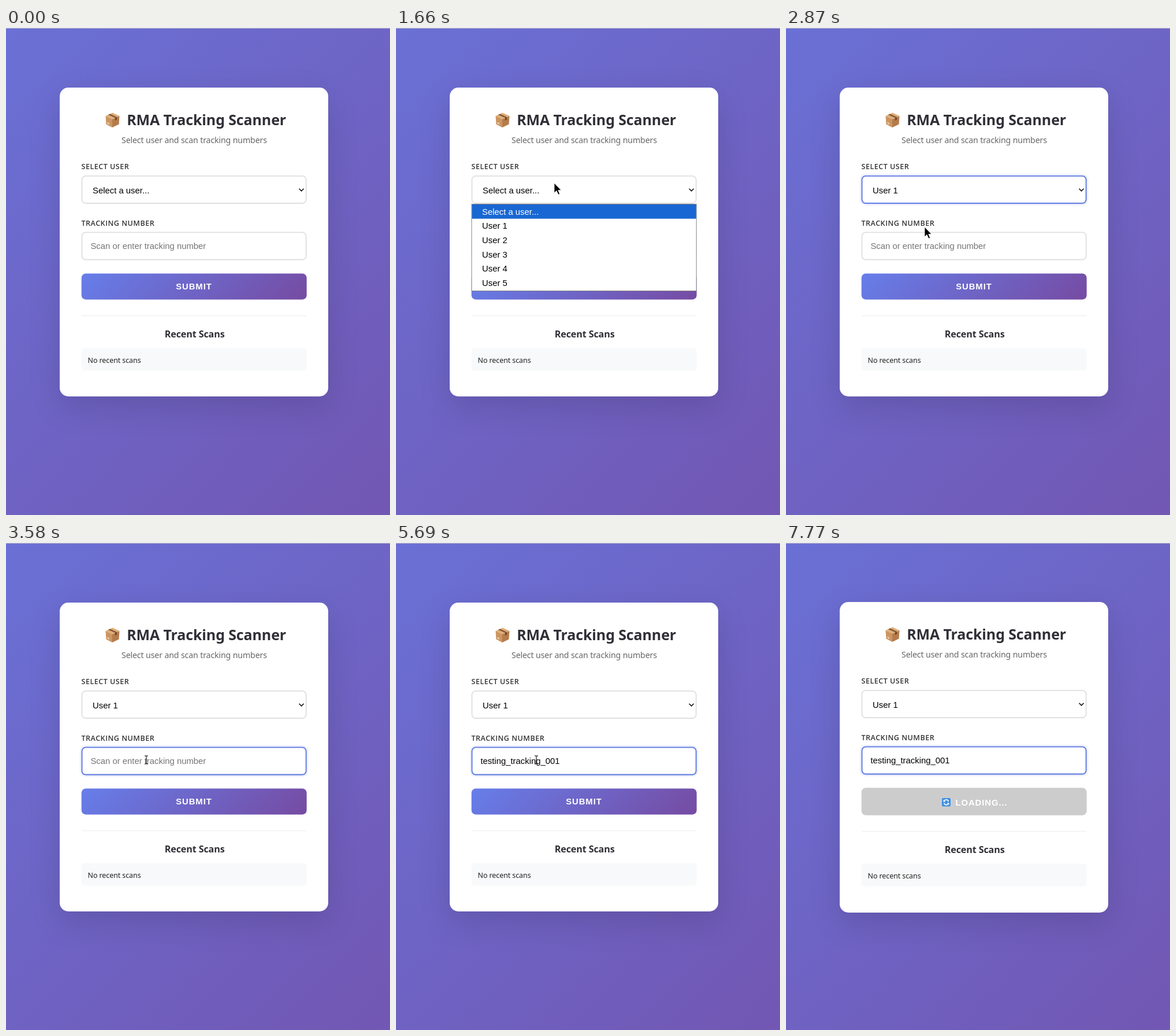
Write an HTML page that moves like this. It is 665 by 842 pixels and loops after 8000 ms.

```html
<!DOCTYPE html>
<html lang="en">
<head>
<meta charset="utf-8">
<title>RMA Tracking Scanner</title>
<style>
html, body { margin: 0; width: 100%; height: 100%; overflow: hidden; }
body { position: relative; background: linear-gradient(135deg, #6a70d5, #7257b3); }
body::before { content: ""; position: absolute; inset: 0 0 auto; height: 1px; background: #b4b4cd; }
.card {
  position: absolute; left: 93px; top: 103px; width: 465px; height: 534px;
  border-radius: 15px; background: #fff;
  box-shadow: 0 18.6px 55.7px rgba(0, 0, 0, .13);
}
svg { position: absolute; left: 0; top: 0; width: 665px; height: 842px; }

/* type */
text { white-space: pre; }
.title, .sub, .recent, .none, .tip text { font-family: "Noto Sans", "Open Sans", sans-serif; }
.title { font-size: 25px; font-weight: 700; letter-spacing: -.13px; fill: #2f2f36; }
.sub { font-size: 14.2px; letter-spacing: -.15px; fill: #666; }
.label { font: 600 12.6px "Open Sans", "Noto Sans", sans-serif; letter-spacing: .47px; fill: #333; }
.recent { font-size: 16.2px; font-weight: 700; letter-spacing: -.15px; fill: #2f2f36; }
.none { font-size: 12.5px; letter-spacing: -.1px; fill: #222; }
.field, .popup text { font: 14.86px "Liberation Sans", Arial, sans-serif; fill: #000; }
.hint { fill: #757575; }
.btn { font: 700 14.86px "Liberation Sans", Arial, sans-serif; letter-spacing: .93px; fill: #fff; }
.tip text { font-size: 10.2px; text-anchor: middle; fill: #444; }
.tip rect { fill: #fff; stroke: #c8c8c8; }

.box { fill: #fff; stroke: #e0e0e0; stroke-width: 1.86; }
.focus { fill: none; stroke: #5f7ce4; stroke-width: 1.86; }
.ring { fill: none; stroke: #667eea; stroke-opacity: .12; stroke-width: 2.8; }

/* timeline: 8 s, 1% = 80 ms */
.step { animation: 8s step-end infinite; }
.ease { animation: 8s ease infinite; }

.card { animation-name: grow; }
.upper { animation-name: up; }
.lower { animation-name: down; }
@keyframes grow { 72.75%, to { top: 102px; height: 536.5px; } }
@keyframes up { 72.75%, to { transform: translateY(-1px); } }
@keyframes down { 72.75%, to { transform: translateY(1px); } }

.unpicked { animation-name: unpicked; }
.picked { animation-name: picked; }
.hint { animation-name: hint; }
.typed { animation-name: typed; }
.ready { animation-name: ready; }
.busy { animation-name: busy; }
@keyframes unpicked { 0% { opacity: 1; } 35.875%, to { opacity: 0; } }
@keyframes picked { 0% { opacity: 0; } 35.875%, to { opacity: 1; } }
@keyframes hint { 0% { opacity: 1; } 64.5%, to { opacity: 0; } }
@keyframes typed { 0% { opacity: 0; } 64.5%, to { opacity: 1; } }
@keyframes ready { 0% { opacity: 1; } 72.75%, to { opacity: 0; } }
@keyframes busy { 0% { opacity: 0; } 72.75%, to { opacity: 1; } }

.fade { animation-name: fade; }
@keyframes fade {
  0% { fill-opacity: 0; }
  72.75% { fill-opacity: .12; }
  73.625% { fill-opacity: .6; }
  74.5%, to { fill-opacity: 1; }
}
.lift { animation-name: lift; }
@keyframes lift {
  0%, 5% { transform: none; }
  6.25% { transform: translateY(-1.1px); }
  9.5%, to { transform: none; }
}

.focus-user { animation-name: focusUser; }
.focus-code { animation-name: focusCode; }
@keyframes focusUser {
  0%, 20.75% { opacity: 0; }
  24.5%, 35.875% { opacity: 1; }
  38.625%, to { opacity: 0; }
}
@keyframes focusCode { 0%, 35.875% { opacity: 0; } 38.625%, to { opacity: 1; } }

.popup { animation-name: popup; }
.mark { animation-name: mark; }
.popup .row0 { animation-name: row0; }
.popup .row1 { animation-name: row1; }
@keyframes popup { 0% { opacity: 0; } 20.75% { opacity: 1; } 35.875%, to { opacity: 0; } }
@keyframes mark { 26.75%, to { transform: translateY(24.7px); } }
@keyframes row0 { 0% { fill: #fff; } 26.75%, to { fill: #000; } }
@keyframes row1 { 0% { fill: #000; } 26.75%, to { fill: #fff; } }

.tip-user { animation-name: tipUser; }
.tip-code { animation-name: tipCode; }
@keyframes tipUser { 0% { opacity: 0; } 19% { opacity: 1; } 20.75%, to { opacity: 0; } }
@keyframes tipCode { 0% { opacity: 0; } 52.125% { opacity: 1; } 54.625%, to { opacity: 0; } }

.caret { animation-name: caret; }
@keyframes caret {
  0%, 43.875%, 57.125% { opacity: 0; transform: none; }
  37.25%, 50.5%, 63.75% { opacity: 1; transform: none; }
  64.5%, 77.875%, 91.25% { opacity: 1; transform: translateX(136.5px); }
  71.125%, 84.625%, 97.125%, to { opacity: 0; transform: translateX(136.5px); }
}

.pointer { animation: move 8s linear infinite; }
.arrow { animation-name: arrow; }
.beam { animation-name: beam; }
@keyframes move {
  0% { transform: translate(565px, 482px); }
  4% { transform: translate(565px, 482px); animation-timing-function: cubic-bezier(.3, .2, .4, 1); }
  12.375% { transform: translate(274px, 268px); }
  20.75% { transform: translate(274px, 268px); animation-timing-function: cubic-bezier(.4, .1, .7, .8); }
  25.75% { transform: translate(248px, 321px); animation-timing-function: ease-out; }
  28.625% { transform: translate(240px, 344px); }
  40% { transform: translate(240px, 344px); animation-timing-function: ease-out; }
  44.75% { transform: translate(243px, 375px); }
  81.5% { transform: translate(243px, 375px); }
  82.875%, to { transform: translate(109px, 374px); }
}
@keyframes arrow {
  0% { opacity: 0; }
  4% { opacity: 1; }
  41.375% { opacity: 0; }
  82.75% { opacity: 1; }
  83.75%, to { opacity: 0; }
}
@keyframes beam { 0% { opacity: 0; } 41.375% { opacity: 1; } 82.75%, to { opacity: 0; } }
</style>
</head>
<body>
<div class="card step"></div>
<svg viewBox="0 0 665 842">
  <defs>
    <linearGradient id="submit" gradientUnits="userSpaceOnUse" x1="217" y1="338.25" x2="434.5" y2="555.75">
      <stop stop-color="#667eea"/><stop offset="1" stop-color="#764ba2"/>
    </linearGradient>
  </defs>

  <g class="upper step">
    <!-- parcel -->
    <g>
      <path d="M172.5 152L184 157.5V172L173.5 166.5Z" fill="#cc9561"/>
      <path d="M196.5 152L184 157.5V172L195.5 166.5Z" fill="#b57c4b"/>
      <path d="M172.5 152L184.5 146.5L196.5 152L184 157.5Z" fill="#dfae77"/>
      <path d="M177 150L180 148.5L192 154L189 155.3Z" fill="#80573a"/>
      <path d="M189 155.3L192 154V158.5L189 160Z" fill="#6b472f"/>
      <path d="M175.5 162.5L179 164.2V167L175.5 165.3Z" fill="#e8cfae"/>
    </g>
    <text class="title" x="209.2" y="168">RMA Tracking Scanner</text>
    <text class="sub" x="200" y="198.5">Select user and scan tracking numbers</text>

    <text class="label" x="130.5" y="244.3">SELECT USER</text>
    <rect class="box" x="131.5" y="255.9" width="388.2" height="47.1" rx="6.5"/>
    <g class="focus-user ease">
      <rect class="ring" x="129.2" y="253.6" width="392.8" height="51.7" rx="8.8"/>
      <rect class="focus" x="131.5" y="255.9" width="388.2" height="47.1" rx="6.5"/>
    </g>
    <text class="field unpicked step" x="150" y="285.5">Select a user...</text>
    <text class="field picked step" x="150" y="285.5">User 1</text>
    <path d="M507.6 277.8L511.6 281.8L515.6 277.8" fill="none" stroke="#111" stroke-width="1.6"/>

    <text class="label" x="130.5" y="342">TRACKING NUMBER</text>
    <rect class="box" x="131.5" y="353.4" width="388.2" height="47.1" rx="6.5"/>
    <g class="focus-code ease">
      <rect class="ring" x="129.2" y="351.1" width="392.8" height="51.7" rx="8.8"/>
      <rect class="focus" x="131.5" y="353.4" width="388.2" height="47.1" rx="6.5"/>
    </g>
    <text class="field hint step" x="146.4" y="382">Scan or enter tracking number</text>
    <text class="field typed step" x="146.4" y="382">testing_tracking_001</text>
    <rect class="caret step" x="147" y="368.5" width="1" height="17" fill="#000"/>
  </g>

  <g class="ready step">
    <g class="lift ease">
      <rect x="130.7" y="424.5" width="390" height="45" rx="7.4" fill="url(#submit)"/>
      <text class="btn" x="294.2" y="452.3">SUBMIT</text>
    </g>
  </g>
  <g class="busy step">
    <rect class="fade step" x="130.7" y="423.3" width="390" height="47.4" rx="7.4" fill="#ccc"/>
    <rect x="270" y="441" width="15" height="14.5" rx="2" fill="#3f8fe6"/>
    <g fill="none" stroke="#fff" stroke-width="1.8">
      <path d="M273.6 449.6A4 4 0 0 0 280.6 451.2"/>
      <path d="M281.4 446.9A4 4 0 0 0 274.4 445.3"/>
    </g>
    <path d="M272.6 443.6V447.4H276.4ZM282.4 453V449.2H278.6Z" fill="#fff"/>
    <text class="btn" x="293.4" y="453.5">LOADING...</text>
  </g>

  <g class="lower step">
    <rect x="130.7" y="497" width="390" height="1" fill="#eee"/>
    <text class="recent" x="274.7" y="534.7">Recent Scans</text>
    <rect x="130.7" y="553.5" width="390" height="39" rx="5" fill="#f8f9fa"/>
    <text class="none" x="141.5" y="578.5">No recent scans</text>
  </g>

  <g class="popup step">
    <rect x="131" y="304.5" width="389.2" height="150" fill="#fff" stroke="#858585"/>
    <rect class="mark step" x="131.4" y="305" width="388.4" height="24.7" fill="#1967d2"/>
    <text class="row0 step" x="149" y="322.5">Select a user...</text>
    <text class="row1 step" x="149" y="347.2">User 1</text>
    <text x="149" y="371.9">User 2</text>
    <text x="149" y="396.6">User 3</text>
    <text x="149" y="421.3">User 4</text>
    <text x="149" y="446">User 5</text>
  </g>

  <g class="tip tip-user step">
    <rect x="283.5" y="282.5" width="168" height="23" rx="3"/>
    <text x="367.5" y="297.7">Please select an item in the list.</text>
  </g>
  <g class="tip tip-code step">
    <rect x="251.5" y="388.5" width="120" height="23" rx="3"/>
    <text x="311.5" y="403.7">Please fill out this field.</text>
  </g>

  <g class="pointer">
    <path class="arrow step" d="M0 0V17L4 13.4L7 20L9.6 18.9L6.8 12.4H12Z" fill="#000" stroke="#fff" stroke-width=".8"/>
    <path class="beam step" d="M-3 -7H-1L0 -6.2L1 -7H3M0 -6.2V6.2M-3 7H-1L0 6.2L1 7H3" fill="none" stroke="#000" stroke-width="1.1"/>
  </g>
</svg>
</body>
</html>
```
